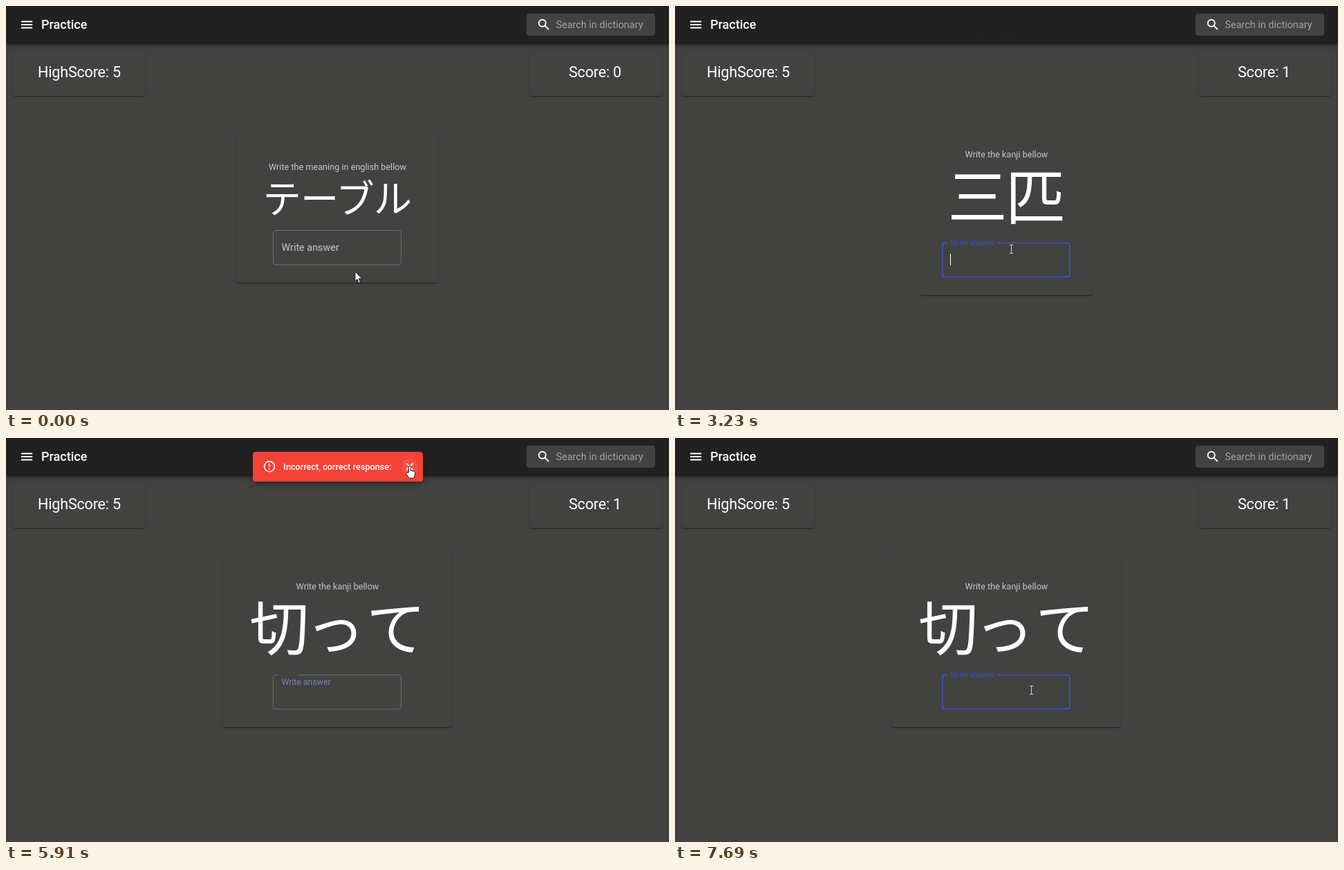
Recreate the animation shown at these times as an HTML page. Size 959 by 584 pixels, loop 8 s.

```html
<!DOCTYPE html>
<html lang="ja">
<head>
<meta charset="utf-8">
<title>Practice</title>
<style>
html, body { margin: 0; width: 100%; height: 100%; overflow: hidden; background: #424241; }
#stage { position: absolute; left: 0; top: 0; width: 959px; height: 584px; overflow: hidden; background: #424241; }
#stage > * { position: absolute; }
svg { left: 0; top: 0; overflow: visible; }
text { font: 14.4px Roboto, sans-serif; fill: #fff; white-space: pre; }
.icon { fill: none; stroke: #fff; }

.card {
  background: #424241; border-radius: 4px;
  box-shadow: 0 2px 1px -1px rgba(0,0,0,.2), 0 1px 1px rgba(0,0,0,.14), 0 1px 3px rgba(0,0,0,.12);
}
.score { top: 66px; width: 192px; height: 64px; }
#quiz { left: 334px; top: 184px; width: 291px; height: 216px; }
[data-question="kanji"] #quiz { left: 355px; top: 166px; width: 249px; height: 252px; }
[data-question="verb"] #quiz { left: 313px; top: 166px; width: 332px; height: 252px; }
#bar {
  left: 0; top: 0; width: 959px; height: 55px; background: #212121;
  box-shadow: 0 2px 4px -1px rgba(0,0,0,.2), 0 4px 5px rgba(0,0,0,.14), 0 1px 9px rgba(0,0,0,.12);
}
#search { left: 753px; top: 11px; width: 186px; height: 32px; border-radius: 4px; background: #424241; }

.title { font-size: 18px; font-weight: 500; }
.big { font-size: 21.6px; letter-spacing: -.01em; text-anchor: middle; }
.hint { fill: #a0a0a0; }
.ask { font-size: 12.6px; letter-spacing: .0025em; text-anchor: middle; fill: #c6c6c6; }
.word { font-family: "Noto Sans CJK JP", "Noto Sans CJK", sans-serif; font-size: 86.4px; letter-spacing: -1.35px; }
.kana { font-size: 55.5px; letter-spacing: -1px; }
.q { visibility: hidden; }
[data-question="kana"] .q.kana-q,
[data-question="kanji"] .q.kanji-q,
[data-question="verb"] .q.verb-q { visibility: visible; }

/* answer field */
#field { transform: translateY(18px); }
[data-question="kana"] #field { transform: none; }
.outline { fill: none; stroke: #6d6d6d; }
.outline.focus { stroke: #3f51b5; stroke-width: 2; visibility: hidden; }
[data-field="hover"] .outline { stroke: #fff; }
[data-field="focus"] .outline { visibility: hidden; }
[data-field="focus"] .outline.focus { visibility: visible; }
#notch { fill: #424241; transform-origin: 394.5px 0; animation: notch 8s linear infinite; }
#label { animation: label 8s cubic-bezier(0,0,.2,1) infinite; }
#caret { fill: #fff; visibility: hidden; }
[data-caret="1"] #caret { visibility: visible; }
@keyframes notch {
  0%, 4.5% { transform: scaleX(0); }
  5.375%, 73.5% { transform: scaleX(1); }
  74.125%, 82.25% { transform: scaleX(0); }
  83.125%, 100% { transform: scaleX(1); }
}
@keyframes label {
  0%, 3.875%, 76%, 81.75% { transform: translate(398.4px, 354px) scale(1); fill: #c6c6c6; }
  6.375%, 73.5%, 84.25%, 100% { transform: translate(398.4px, 327.5px) scale(.75); fill: #3f51b5; }
}

/* notifications */
.snack {
  top: 19.5px; height: 42.5px; border-radius: 4px; opacity: 0;
  box-shadow: 0 3px 5px -1px rgba(0,0,0,.2), 0 5px 9px rgba(0,0,0,.14), 0 1px 16px rgba(0,0,0,.12);
}
.snack svg { position: absolute; }
.snack text { font-size: 12.6px; font-weight: 500; letter-spacing: .003em; }
.snack .icon { stroke-width: 1.65; }
#good { left: 412px; width: 134px; background: #4caf50; }
#bad { left: 356.5px; width: 245.5px; background: #f44336; }
#good { animation: good-fade 8s cubic-bezier(.4,0,.2,1) infinite, good-grow 8s cubic-bezier(.4,0,.2,1) infinite; }
#bad { animation: bad-fade 8s cubic-bezier(.4,0,.2,1) infinite, bad-grow 8s cubic-bezier(.4,0,.2,1) infinite; }
.halo { fill: #fff; fill-opacity: .08; visibility: hidden; }
[data-cursor="hand"] .halo { visibility: visible; }
@keyframes good-fade {
  0%, 21.5% { opacity: 0; }
  24.05%, 38.75% { opacity: 1; }
  40.625%, 100% { opacity: 0; }
}
@keyframes good-grow {
  0%, 21.5% { transform: scale(.75, .5625); }
  23.2%, 39.375% { transform: none; }
  40.625%, 100% { transform: scale(.75, .5625); }
}
@keyframes bad-fade {
  0%, 57% { opacity: 0; }
  59.55%, 74.75% { opacity: 1; }
  77.3%, 100% { opacity: 0; }
}
@keyframes bad-grow {
  0%, 57% { transform: scale(.75, .5625); }
  58.7%, 75.6% { transform: none; }
  77.3%, 100% { transform: scale(.75, .5625); }
}

/* mouse */
#mouse { animation: move 8s linear infinite; }
#mouse path { visibility: hidden; fill: #fff; stroke: #000; stroke-width: .8; }
#mouse .ibeam { fill: none; stroke: #d0d0d0; stroke-width: 1; }
[data-cursor="arrow"] #mouse .arrow,
[data-cursor="ibeam"] #mouse .ibeam,
[data-cursor="hand"] #mouse .hand { visibility: visible; }
@keyframes move {
  0%, .375% { transform: translate(505px, 384px); }
  3.125%, 60.625% { transform: translate(486px, 351px); }
  64.375%, 67% { transform: translate(577px, 374px); }
  70% { transform: translate(594px, 180px); animation-timing-function: ease-out; }
  72.5%, 74.75% { transform: translate(584px, 41px); }
  76.75% { transform: translate(588px, 102px); }
  77.125% { transform: translate(582px, 125px); }
  80.75% { transform: translate(516px, 350px); }
  81.5%, 100% { transform: translate(515px, 364px); }
}
</style>
</head>
<body>
<div id="stage" data-question="kana" data-field="idle" data-caret="0" data-cursor="arrow">
  <div class="card score" style="left:10px"></div>
  <div class="card score" style="left:757px"></div>
  <div class="card" id="quiz"></div>
  <div id="bar"></div>
  <div id="search"></div>

  <svg width="959" height="584">
    <path class="icon" stroke-width="1.8" d="M22 22.5h16.2M22 27h16.2M22 31.5h16.2"/>
    <text class="title" x="51" y="33">Practice</text>
    <g class="icon" stroke-width="1.9">
      <circle cx="775.8" cy="24.8" r="5"/>
      <path d="M779.3 28.3L785 34"/>
    </g>
    <text class="hint" x="795.5" y="32">Search in dictionary</text>
    <text class="big" x="106" y="102.5">HighScore: 5</text>
    <text class="big" x="852" y="102.5" id="score">Score: 0</text>

    <g class="q kana-q">
      <text class="ask" x="479.5" y="237">Write the meaning in english bellow</text>
      <text class="word kana" x="371.5" y="299">テーブル</text>
    </g>
    <g class="q kanji-q">
      <text class="ask" x="479.5" y="219">Write the kanji bellow</text>
      <text class="word" x="394.5 478" y="308">三匹</text>
    </g>
    <g class="q verb-q">
      <text class="ask" x="479.5" y="219">Write the kanji bellow</text>
      <text class="word" x="352 433 521" y="307">切って</text>
    </g>

    <g id="field">
      <rect class="outline" x="386.5" y="324.5" width="185" height="49.5" rx="3.5"/>
      <rect class="outline focus" x="387" y="324.5" width="184" height="49" rx="3"/>
      <rect id="notch" x="394.5" y="322" width="72.5" height="5"/>
      <text id="label">Write answer</text>
      <text id="typed" x="398.4" y="354"></text>
      <rect id="caret" x="398" y="340" width="1" height="17"/>
    </g>
  </svg>

  <div class="snack" id="good">
    <svg width="134" height="43">
      <g class="icon" transform="translate(24 21.3)">
        <path d="M7.4 0A7.4 7.4 0 1 1 2.2 -7.1M-4 -1L-.8 2.2 6.9 -5.5"/>
      </g>
      <text x="44.3" y="25.5">Correct!</text>
      <path class="icon" d="M110.5 16.5l9.6 9.6m0 -9.6l-9.6 9.6"/>
    </svg>
  </div>
  <div class="snack" id="bad">
    <svg width="246" height="43">
      <g class="icon" transform="translate(24 21.3)">
        <circle r="7.4"/>
        <path d="M0 -4.1V.8M0 2.5V4.1"/>
      </g>
      <text x="44.3" y="25.5">Incorrect, correct response:</text>
      <circle class="halo" cx="226.9" cy="21.3" r="11.7"/>
      <path class="icon" d="M222.1 16.5l9.6 9.6m0 -9.6l-9.6 9.6"/>
    </svg>
  </div>

  <svg id="mouse" width="24" height="24">
    <path class="arrow" d="M0 0V13.8L3.1 10.9 5.3 16.3 7.5 15.4 5.3 10.1H9.8Z"/>
    <path class="ibeam" d="M-2 -5.5H3M.5 -5.5V6.5M-2 6.5H3"/>
    <path class="hand" d="M-1.5 9V1a1.5 1.5 0 0 1 3 0V6l5 1.2q1.5 .4 1.4 2L7 13.5 6 17H-1L-5 10.5q0 -2 2 -1.2Z"/>
  </svg>
</div>

<script>
const LOOP = 8000;
const $ = id => document.getElementById(id);
const stage = $('stage'), typed = $('typed'), caret = $('caret'), score = $('score');

// Each track lists [start in ms, value].
const states = {
  question: [[0, 'kana'], [1720, 'kanji'], [4550, 'verb']],
  field: [[0, 'idle'], [100, 'hover'], [310, 'focus'], [5880, 'idle'], [6450, 'hover'], [6540, 'focus']],
  cursor: [[0, 'arrow'], [100, 'ibeam'], [5130, 'arrow'], [5440, 'ibeam'], [5550, 'arrow'],
    [5740, 'hand'], [6010, 'arrow'], [6310, 'ibeam']],
  // the caret flips at each of these times
  caret: [310, 690, 1090, 2080, 2480, 2840, 3230, 3600, 3960, 4930, 5300, 5680, 6540, 6930, 7290, 7690]
    .reduce((list, time, i) => [...list, [time, 1 - i % 2]], [[0, 0]])
};
const typing = [[0, ''], [1090, 't'], [1190, 'ta'], [1350, 'tab'], [1430, 'tabl'], [1520, 'table'], [1720, ''],
  [4160, 'a'], [4240, 'asd'], [4320, 'asdf'], [4550, '']];

const valueAt = (track, t) => track.filter(step => step[0] <= t).pop()[1];

function setText(el, text) {
  if (el.textContent !== text) el.textContent = text;
}

function render(t) {
  for (const name in states) stage.dataset[name] = valueAt(states[name], t);
  setText(score, t < 1720 ? 'Score: 0' : 'Score: 1');
  setText(typed, valueAt(typing, t));
  const width = typed.textContent ? typed.getComputedTextLength() : 0;
  caret.setAttribute('x', Math.floor(398.4 + width));
}

let start;
function tick(now) {
  start ??= now;
  render((now - start) % LOOP);
  requestAnimationFrame(tick);
}
requestAnimationFrame(tick);
</script>
</body>
</html>
```
